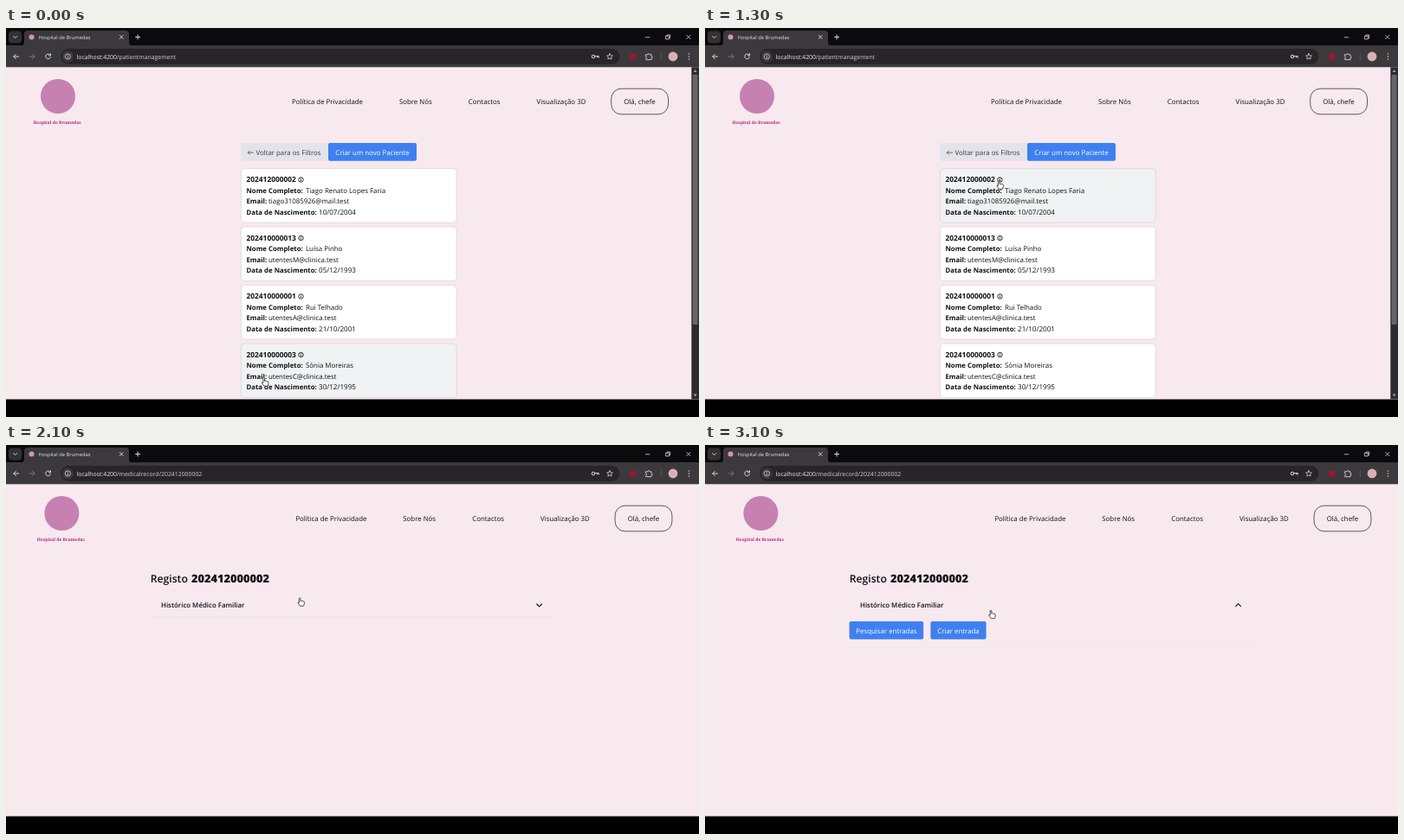
An HTML page for the animation above (3200 ms loop, 800 by 450 pixels).

```html
<!DOCTYPE html>
<html lang="pt">
<head>
<meta charset="utf-8">
<title>Hospital de Brumedas</title>
<style>
  html, body { margin: 0; width: 100%; height: 100%; overflow: hidden; background: #000; }
  svg { display: block; width: 800px; height: 450px; }
  text { font-family: "Open Sans", "Noto Sans", sans-serif; text-rendering: geometricPrecision; white-space: pre; }
  .line { fill: none; stroke: #d9d6d8; stroke-width: 1; stroke-linecap: round; stroke-linejoin: round; }
  .brand { font-family: "Noto Serif", serif; font-weight: 700; fill: #b02a82; }
</style>
</head>
<body>
<svg id="stage" viewBox="0 0 800 450"></svg>
<script>
const LOOP = 3200, STEP = 100;
const PAGE_CHANGE = 1400, RECORD_SHOWN = 1700, SECTION_OPEN = 2900;
const BLUE = '#3f80f1', INK = '#111014';

const text = (x, y, size, str, attrs = '') =>
  `<text x="${x}" y="${y}" font-size="${size}" fill="${INK}" ${attrs}>${str}</text>`;
const rect = (x, y, w, h, fill, r = 0, attrs = '') =>
  `<rect x="${x}" y="${y}" width="${w}" height="${h}" rx="${r}" fill="${fill}" ${attrs}/>`;
const circle = (x, y, r, fill, attrs = '') =>
  `<circle cx="${x}" cy="${y}" r="${r}" fill="${fill}" ${attrs}/>`;
const line = (d, attrs = '') => `<path class="line" d="${d}" ${attrs}/>`;
const group = (id, body, attrs = '') => `<g id="${id}" ${attrs}>${body}</g>`;
const bold = 'font-weight="700"';
const centred = 'text-anchor="middle"';

function browserChrome() {
  return rect(0, 0, 800, 20.5, '#0b0a0c') +
    rect(0, 20, 800, 25.3, '#3c393c') +
    rect(3, 3.5, 15, 14, '#343135', 4) + line('M8.7 9.6l2 2 2-2') +
    '<path d="M17 20.5q4 0 4-4V7q0-4 4-4H138q4 0 4 4v9.5q0 4 4 4z" fill="#3c393c"/>' +
    circle(29.5, 10.5, 3, '#d394b9') +
    text(37.5, 12.9, 5.8, 'Hospital de Brumedas', 'style="fill:#e6e3e5"') +
    line('M131.3 8.6l3.8 3.8m0-3.8l-3.8 3.8M149.6 10.5h5m-2.5-2.5v5') +
    line('M738.3 10.8h4.6M761.8 9.3h3.6v3.6h-3.6zM763 9V8h3.7v3.7h-1M785.7 8.3l4.4 4.4m0-4.4l-4.4 4.4', 'style="stroke-width:.8"') +
    line('M14.5 33H8.8m2.6-2.6L8.8 33l2.6 2.6') +
    line('M27.3 33h5.7m-2.6-2.6L33 33l-2.6 2.6', 'style="stroke:#787478"') +
    line('M51.2 31.4a2.9 2.9 0 1 0 .3 2.3M51.5 29.8v2h-2') +
    rect(63, 24, 645.5, 18, '#282528', 9) +
    circle(71.3, 33, 6.6, '#3b383b') +
    line('M71.3 32.8v1.9m0-3.4v.1', 'style="stroke-width:.8"') +
    circle(71.3, 33, 3.1, 'none', 'stroke="#d9d6d8" stroke-width=".8"') +
    `<text x="81.5" y="35.5" font-size="6.9" fill="#f0eef0">localhost:4200<tspan id="path" fill="#d2cfd2"></tspan></text>` +
    circle(678, 33, 1.8, 'none', 'stroke="#d9d6d8" stroke-width="1"') +
    line('M680 32.6h4.3v1.6m-1.7-1.4v1.2') +
    line('M697 29.6l1 2.2 2.4.3-1.8 1.6.5 2.4-2.1-1.2-2.1 1.2.5-2.4-1.8-1.6 2.4-.3z', 'style="stroke-width:.8"') +
    rect(720.5, 30, 6.4, 6.4, '#a5152b', 1) +
    line('M738.8 30.8h2a1.1 1.1 0 0 1 2.2 0h2v2a1.1 1.1 0 0 1 0 2.2v1.7h-6.2v-1.8a1.1 1.1 0 0 0 0-2.1z', 'style="stroke-width:.9"') +
    line('M756.3 29.5v7', 'style="stroke:#686468;stroke-width:.7"') +
    circle(770, 33, 5.4, '#d9b1b5') +
    [30, 33, 36].map(y => circle(788.5, y, .75, '#d9d6d8')).join('');
}

function siteHeader() {
  const links = [['Política de Privacidade', 371], ['Sobre Nós', 472.8],
    ['Contactos', 552.2], ['Visualização 3D', 641], ['Olá, chefe', 731.5]];
  return circle(60, 79, 20, '#c681b2') +
    text(59, 111, 4.95, 'Hospital de Brumedas', `class="brand" ${centred}`) +
    rect(698.7, 70.2, 65.8, 29.6, 'none', 11.5, 'stroke="#39343a" stroke-width=".8"') +
    links.map(([label, x]) => text(x, 88.3, 7.87, label, centred)).join('');
}

function patientCard([id, name, email, born], i) {
  const y = 162.5 + i * 67.5;
  const row = (n, label, x, value, size) =>
    text(277.5, y + 15.9 + n * 12.5, 7.8, label, bold) +
    text(x, y + 15.9 + n * 12.5, size, value);
  return rect(271.4, y, 248.8, 62.6, '#fff', 4, 'class="card" stroke="#ddd5dc" stroke-width=".8"') +
    text(277.5, y + 15.9, 8.4, id, bold) +
    circle(340.5, y + 13, 2.7, 'none', `stroke="${INK}" stroke-width=".9"`) +
    line(`M340.5 ${y + 12.9}v1.4m0-2.7v.1`, `style="stroke:${INK};stroke-width:.8"`) +
    row(1, 'Nome Completo:', 346, name, 7.9) +
    row(2, 'Email:', 303, email, 7.9) +
    row(3, 'Data de Nascimento:', 361, born, 8.1);
}

function patientList() {
  const patients = [
    ['202412000002', 'Tiago Renato Lopes Faria', 'tiago31085926@mail.test', '10/07/2004'],
    ['202410000013', 'Luísa Pinho', 'utentesM@clinica.test', '05/12/1993'],
    ['202410000001', 'Rui Telhado', 'utentesA@clinica.test', '21/10/2001'],
    ['202410000003', 'Sónia Moreiras', 'utentesC@clinica.test', '30/12/1995']
  ];
  return rect(271, 133, 104, 20.8, '#e3e4ea', 2) +
    line('M285.6 144.1h-6.2m2-2l-2 2 2 2', 'style="stroke:#343a46;stroke-width:.7"') +
    text(288.5, 146.7, 7.83, 'Voltar para os Filtros', 'style="fill:#343a46"') +
    rect(372, 133, 102, 20.8, BLUE, 2) +
    text(423, 146.7, 7.87, 'Criar um novo Paciente', `${centred} style="fill:#fff"`) +
    patients.map(patientCard).join('') +
    rect(791.3, 45.3, 8.7, 384.2, '#2d2b2d') +
    rect(792.6, 54, 6, 289, '#686568', 1) +
    '<path d="M795.6 48l2 3h-4zM795.6 426.500l2-3h-4z" fill="#a09da0"/>';
}

function blueButton(x, width, label) {
  return rect(x, 204, width, 20.8, BLUE, 2) +
    text(x + width / 2, 217.5, 7.87, label, `${centred} style="fill:#fff"`);
}

function medicalRecord() {
  return text(166.7, 158.8, 12.2, 'Registo', 'font-weight="600"') +
    text(214, 158.8, 12.8, '202412000002', 'font-weight="800"') +
    text(179, 188.2, 7.87, 'Histórico Médico Familiar', 'font-weight="600"') +
    line('M612.700 184l2.900 2.900 2.900-2.900', `id="chevron" style="stroke:${INK};stroke-width:1.1"`) +
    line('M167 198.500H632', 'id="rule" style="stroke:#f2e3e9;stroke-width:.8"') +
    group('section', blueButton(166.6, 85.6, 'Pesquisar entradas') + blueButton(260.4, 64.2, 'Criar entrada'));
}

// Both pointers have their hot spot at 0,0.
function pointers() {
  const style = 'fill="#fff" stroke="#17151a" stroke-width=".75" stroke-linejoin="round"';
  return `<path id="hand" ${style} d="M-.8 .8Q0-.6 .8 .8V4q.8-.6 1.500.1.800-.5 1.400.2 1.100-.4 1.400.7V7.200Q5 8.500 4.300 9.700H.2Q-.6 8.300-2 6.500-2.600 5.300-1.500 5.400L-.8 6z"/>` +
    `<path id="arrow" ${style} d="M.5 .5V8.200L2.300 6.600 3.500 9.200 4.700 8.700 3.600 6.100H6z"/>`;
}

document.getElementById('stage').innerHTML =
  rect(0, 0, 800, 450, '#000') +
  '<clipPath id="view"><rect width="800" height="429.5"/></clipPath><g clip-path="url(#view)">' +
  rect(0, 45, 800, 385, '#f8e9ee') + group('header', siteHeader()) +
  group('list', patientList()) + group('record', medicalRecord()) + '</g>' +
  browserChrome() + group('cursor', pointers());

const $ = id => document.getElementById(id);
const show = (id, on) => $(id).setAttribute('display', on ? 'inline' : 'none');
const cards = document.querySelectorAll('.card');

// time, x, y
const cursorPath = [
  [0, 297.7, 404.5], [100, 298, 404], [200, 304, 392], [300, 319, 352], [400, 335, 317],
  [500, 343.5, 277.5], [700, 344, 236], [900, 341.5, 198], [1100, 339.4, 179],
  [1200, 339.2, 176.5], [3000, 339.2, 176.5], [3100, 330, 191]
];
// enter and leave time of the pointer, per card
const hovers = [[800, LOOP], [500, 770], [300, 500], [-LOOP, 300]];
const FADE = 300;

function cursorAt(t) {
  const i = cursorPath.findIndex(p => p[0] >= t);
  if (i < 1) return cursorPath[0].slice(1);
  const [a, b] = [cursorPath[i - 1], cursorPath[i]];
  const k = (t - a[0]) / (b[0] - a[0]);
  return [1, 2].map(n => a[n] + (b[n] - a[n]) * k);
}

function hoverAmount([enter, leave], t) {
  const rise = Math.min(1, Math.max(0, (Math.min(t, leave) - enter) / FADE));
  return Math.max(0, rise - Math.max(0, t - leave) / FADE);
}

function mix(k) {
  const to = [240, 242, 244];
  return `rgb(${to.map(v => Math.round(255 + (v - 255) * k))})`;
}

function draw(now) {
  const t = Math.floor((now % LOOP) / STEP) * STEP;
  const onRecord = t >= PAGE_CHANGE, loaded = t >= RECORD_SHOWN, open = t >= SECTION_OPEN;
  show('list', !onRecord);
  show('record', loaded);
  show('section', open);
  show('hand', !onRecord || loaded);
  show('arrow', onRecord && !loaded);
  $('header').setAttribute('transform', `translate(${onRecord ? 4.4 : 0} 0)`);
  $('path').textContent = onRecord ? '/medicalrecord/202412000002' : '/patientmanagement';
  $('chevron').setAttribute('transform', open ? 'rotate(180 615.6 185.3)' : '');
  $('rule').setAttribute('transform', `translate(0 ${open ? 35.5 : 0})`);
  $('cursor').setAttribute('transform', `translate(${cursorAt(t)})`);
  cards.forEach((card, i) => card.setAttribute('fill', mix(hoverAmount(hovers[i], t))));
}

let start;
function tick(now) {
  start ??= now;
  draw(now - start);
  requestAnimationFrame(tick);
}
draw(0);
requestAnimationFrame(tick);
</script>
</body>
</html>
```
